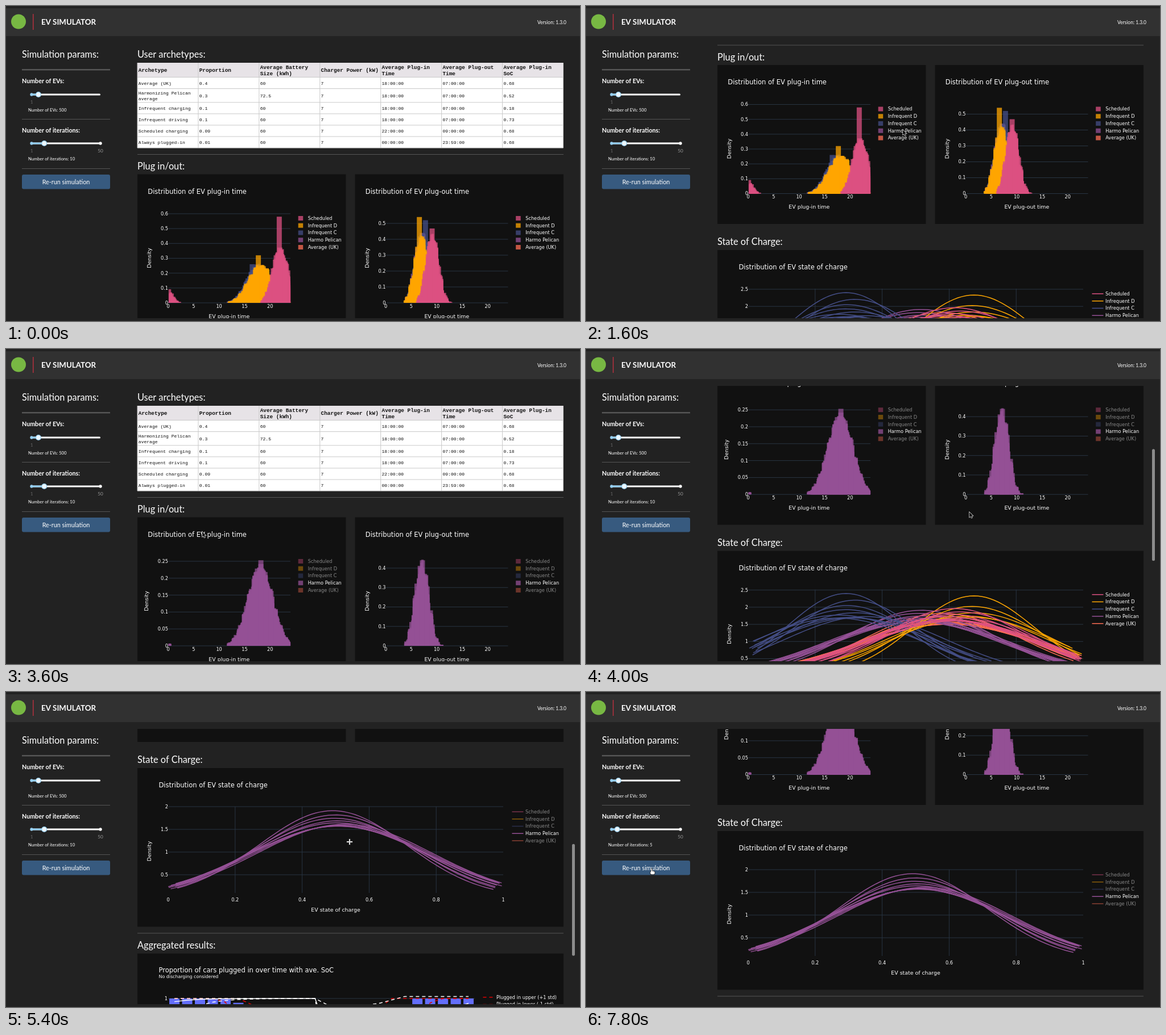
An HTML page with a canvas for the animation above (8 s loop, 1009x555 px).

```html
<!DOCTYPE html>
<html lang="en">
<head>
<meta charset="utf-8">
<title>EV Simulator</title>
<style>
html, body { margin: 0; width: 100%; height: 100%; overflow: hidden; background: #222; }
canvas { display: block; }
</style>
</head>
<body>
<canvas id="stage" width="1009" height="555"></canvas>
<script>
const ctx = document.getElementById('stage').getContext('2d');
const LOOP = 8000, STEP = 200;
const LATO = 'Lato, sans-serif', SANS = '"DejaVu Sans", sans-serif', MONO = '"Liberation Mono", monospace';
const GRID = '#283442', PANEL = '#111', RULE = '#555';

// plugIn / plugOut: bell of hours plus one tall bin; charge: family of bells over 0..1
const TRACES = [
  { name: 'Scheduled', color: '#dd5182',
    plugIn: { mean: 22, sd: 1.4, peak: 0.36, bin: 21.3, top: 0.58 },
    plugOut: { mean: 9.15, sd: 1.15, peak: 0.41, bin: 8.6, top: 0.468 },
    charge: { mean: 0.61, spread: 0.05, low: 1.6, high: 1.96, count: 10 } },
  { name: 'Infrequent D', color: '#ffa600',
    plugIn: { mean: 18.1, sd: 2.3, peak: 0.25, bin: 17.2, top: 0.32 },
    plugOut: { mean: 7, sd: 1.25, peak: 0.41, bin: 6.1, top: 0.54 },
    charge: { mean: 0.66, spread: 0.03, low: 1.7, high: 2.33, count: 5 } },
  { name: 'Infrequent C', color: '#444e86',
    plugIn: { mean: 17.7, sd: 2.2, peak: 0.25, bin: 16, top: 0.26 },
    plugOut: { mean: 7.2, sd: 1.25, peak: 0.42, bin: 7.3, top: 0.52 },
    charge: { mean: 0.31, spread: 0.1, low: 1.68, high: 2.4, count: 10, short: true } },
  { name: 'Harmo Pelican', color: '#955196', focus: true,
    plugIn: { mean: 18.1, sd: 2.35, peak: 0.23, bin: 17.7, top: 0.253 },
    plugOut: { mean: 7.1, sd: 1.25, peak: 0.42, bin: 6.7, top: 0.44 },
    charge: { mean: 0.51, spread: 0.04, low: 1.57, high: 1.91, count: 10 } },
  { name: 'Average (UK)', color: '#ff6e54',
    plugIn: { mean: 18, sd: 2.2, peak: 0.2, bin: 17.5, top: 0.21 },
    plugOut: { mean: 7, sd: 1.1, peak: 0.3, bin: 6.5, top: 0.31 },
    charge: { mean: 0.6, spread: 0.04, low: 1.5, high: 1.82, count: 10 } }
];
const STACK = [...TRACES].reverse();

// stops: [arrive, leave, value...]
const SCROLL = [[0, 300, 0], [1000, 2900, 192.5], [3400, 3650, 0], [4300, 5000, 478.5],
  [5300, 5900, 488.5], [6400, 6650, 658], [7000, LOOP, 377.5]];
const POINTER = [[0, 800, 640, 330], [1600, 2000, 557, 218], [2500, 2800, 938, 218], [3400, 3650, 345, 322],
  [4300, 4900, 935, 260], [5400, 5900, 604, 264], [6600, 6900, 83, 243], [7400, 7400, 55, 241],
  [7700, LOOP, 115, 311]];
const ITERATIONS = [[0, 7100, 10], [7400, LOOP, 5]];

function at(stops, t) {
  const i = stops.findIndex(s => t <= s[1]), to = stops[i], from = stops[i - 1];
  if (!from || t >= to[0]) return to.slice(2);
  const u = (t - from[1]) / (to[0] - from[1]), e = u * u * (3 - 2 * u);
  return from.slice(2).map((v, k) => v + (to[k + 2] - v) * e);
}

function random(seed) {
  return () => {
    seed = (seed * 16807) % 2147483647;
    return seed / 2147483647;
  };
}

const bell = (x, mean, sd) => Math.exp(-((x - mean) ** 2) / (2 * sd * sd));
const sigmoid = x => 1 / (1 + Math.exp(-x));
const clamp01 = x => Math.min(1, Math.max(0, x));

function rect(x, y, w, h, color) {
  ctx.fillStyle = color;
  ctx.fillRect(x, y, w, h);
}

function pill(x, y, w, h, r, color) {
  ctx.fillStyle = color;
  ctx.beginPath();
  ctx.roundRect(x, y, w, h, r);
  ctx.fill();
}

const disc = (x, y, r, color) => pill(x - r, y - r, 2 * r, 2 * r, r, color);

function line(points, color, dash = []) {
  ctx.strokeStyle = color;
  ctx.lineWidth = 1.5;
  ctx.setLineDash(dash);
  ctx.beginPath();
  points.forEach(p => ctx.lineTo(p[0], p[1]));
  ctx.stroke();
  ctx.setLineDash([]);
}

// y is the middle of the capitals
function text(s, x, y, size, { font = SANS, align = 'left', color = '#fff', weight = 400 } = {}) {
  ctx.font = `${weight} ${size}px ${font}`;
  ctx.textAlign = align;
  ctx.fillStyle = color;
  ctx.fillText(s, x, y + size * 0.36);
}

const lato = (s, x, y, size, opts) => text(s, x, y, size, { font: LATO, ...opts });
const heading = (s, x, y) => lato(s, x, y, 16.3);
const title = (s, x, y) => text(s, x, y, 11.5);
const label = (s, x, y, align = 'center') => text(String(s), x, y, 8.2, { align });
const axis = (s, x, y) => text(s, x, y, 9.4, { align: 'center' });

function upright(s, x, y) {
  ctx.save();
  ctx.translate(x, y);
  ctx.rotate(-Math.PI / 2);
  axis(s, 0, 0);
  ctx.restore();
}

function drawHeader() {
  rect(0, 4, 1009, 49, '#313131');
  disc(22, 27.5, 13, '#78b843');
  rect(47, 14, 1.5, 28, '#b5303f');
  lato('EV SIMULATOR', 62, 28.5, 13.3, { weight: 700 });
  lato('Version: 1.3.0', 985, 28.5, 8.5, { align: 'right' });
}

function drawSlider(y, thumb, last) {
  pill(45, y - 1.5, 121, 3, 1.5, '#fff');
  rect(45, y - 1.5, thumb - 45, 3, '#8ecbf0');
  disc(45, y, 2.7, '#96d0f3');
  if (last) disc(166, y, 2.7, '#fff');
  disc(thumb, y, 5, '#96d0f3');
  disc(thumb, y, 3.8, '#eef7fd');
  lato('1', 45, y + 13.5, 8.2, { align: 'center', color: '#666' });
  lato(last, 166, y + 13.5, 8.2, { align: 'center', color: '#999' });
}

function drawSidebar(n) {
  heading('Simulation params:', 28, 85.5);
  rect(28, 111, 155, 2.5, RULE);
  lato('Number of EVs:', 28, 132.5, 10.7, { weight: 700 });
  drawSlider(156, 57, '');
  lato('Number of EVs: 500', 39, 183, 7.6);
  rect(28, 199, 155, 1, RULE);
  lato('Number of iterations:', 28, 219, 10.7, { weight: 700 });
  drawSlider(242, 45 + (n - 1) / 49 * 121, '50');
  lato('Number of iterations: ' + n, 39, 269, 7.6);
  rect(28, 286, 155, 1, RULE);
  pill(28, 297, 155, 25.5, 3, '#375a7f');
  lato('Re-run simulation', 105.5, 310, 10.8, { align: 'center' });
}

function drawTable() {
  const rows = [
    'Archetype,Proportion,Average Battery|Size (kWh),Charger Power (kW),'
      + 'Average Plug-in|Time,Average Plug-out|Time,Average Plug-in|SoC',
    'Average (UK),0.4,60,7,18:00:00,07:00:00,0.68',
    'Harmonizing Pelican|average,0.3,72.5,7,18:00:00,07:00:00,0.52',
    'Infrequent charging,0.1,60,7,18:00:00,07:00:00,0.18',
    'Infrequent driving,0.1,60,7,18:00:00,07:00:00,0.73',
    'Scheduled charging,0.09,60,7,22:00:00,09:00:00,0.68',
    'Always plugged-in,0.01,60,7,00:00:00,23:59:00,0.68'
  ];
  const colX = i => 231 + i * 106.93;
  rect(231, 100, 748.5, 150, '#fff');
  rect(231, 100, 748.5, 25.5, '#e7e3e7');
  let y = 100;
  rows.forEach((row, r) => {
    const h = r === 0 ? 25.5 : row.includes('|') ? 24.3 : 20.05;
    const gap = r ? 10 : 11;
    const style = { font: MONO, color: '#111', weight: r ? 400 : 700 };
    row.split(',').forEach((cell, c) => cell.split('|').forEach((part, k, all) =>
      text(part, colX(c) + 1.8, y + h / 2 + 0.3 + (k - (all.length - 1) / 2) * gap, r ? 8.05 : 9.38, style)));
    y += h;
    rect(231, y - 0.5, 748.5, 1, '#c9c9c9');
  });
  for (let i = 0; i < 8; i++) rect(colX(i) - 0.5, 100, 1, 150, '#c9c9c9');
}

function drawLegend(x, y, solo, bars) {
  TRACES.forEach(({ name, color, focus }, i) => {
    const cy = y + i * 12.75, dim = solo && !focus ? 0.5 : 1;
    ctx.globalAlpha = dim * (bars ? 0.75 : 1);
    if (bars) rect(x, cy - 4, 8.5, 8, color);
    else rect(x, cy - 0.75, 20, 1.5, color);
    ctx.globalAlpha = dim;
    label(name, x + (bars ? 17 : 23.5), cy, 'left');
    ctx.globalAlpha = 1;
  });
}

function drawHistogram(x, kind, key, solo, unit, tick, count) {
  const base = 523, left = x + 54, hour = 8.96;
  rect(x, 296.5, 366.5, 280, PANEL);
  title(`Distribution of EV ${kind} time`, x + 18.3, 326.5);
  for (let i = 0; i <= count; i++) {
    const y = base - i * tick * unit;
    rect(left, y - 0.5, 215, 1, GRID);
    label(+(i * tick).toFixed(2), left, y, 'right');
  }
  const bar = (from, w, h) => {
    const a = from % 24;
    ctx.fillRect(left + a * hour, base - h * unit, Math.min(w, 24 - a) * hour, h * unit);
  };
  ctx.globalAlpha = 0.75;
  STACK.filter(s => s.focus || !solo).forEach((trace, i) => {
    const { mean, sd, peak, bin, top } = trace[key], rnd = random(77 + i * 131);
    ctx.fillStyle = trace.color;
    bar(bin, 1, top);
    // one layer of bins per simulation run
    for (let run = 0; run < 10; run++) {
      const w = run % 2 ? 1 : 0.5;
      for (let a = mean - 2.8 * sd + rnd(); a < mean + 2.6 * sd; a += w) {
        bar(a, w, peak * bell(a + w / 2, mean, sd) * (0.88 + rnd() * 0.18));
      }
    }
  });
  ctx.globalAlpha = 1;
  for (let h = 0; h <= 20; h += 5) label(h, left + h * hour, 529);
  axis(`EV ${kind} time`, x + 161.3, 546.5);
  upright('Density', x + (tick < 0.1 ? 16 : 21), 444);
  drawLegend(x + 282.7, 374, solo, true);
}

function drawCharge(solo) {
  const floor = solo ? 0.1 : 0, unit = solo ? 80 : 60.4;
  const X = v => 285 + v * 589, Y = v => 842.5 - (v - floor) * unit;
  rect(231, 622.5, 749, 279.5, PANEL);
  title('Distribution of EV state of charge', 268.5, 652.3);
  for (let i = 0; i <= 5; i++) {
    if (i % 5) rect(X(i / 5) - 0.5, 690.5, 1, 152, GRID);
    label(i / 5, X(i / 5), 855);
  }
  for (let v = solo ? 0.5 : 0; v <= (solo ? 2 : 2.5); v += 0.5) {
    rect(285, Y(v) - 0.5, 589, 1, GRID);
    label(v, 285, Y(v), 'right');
  }
  STACK.filter(s => s.focus || !solo).forEach(({ color, charge: c }, i) => {
    const rnd = random(4021 + i * 977000);
    for (let k = 0; k < c.count; k++) {
      const peak = c.low + (c.high - c.low) * (1 - k / c.count) ** 3;
      const mean = c.mean + (rnd() - 0.5) * c.spread;
      const from = rnd() * 0.03, to = c.short ? 0.67 + rnd() * 0.3 : 0.96 + rnd() * 0.037;
      const points = [];
      for (let u = 0; u <= 1; u += 0.0125) {
        const v = from + (to - from) * u;
        points.push([X(v), Y(peak * bell(v, mean, 0.42 / peak))]);
      }
      line(points, color);
    }
  });
  axis('EV state of charge', 579.5, 872.5);
  upright('Density', 252, 769);
  drawLegend(889.5, 699.5, solo, false);
}

// share of cars at home: away between two hours
const home = (leave, back) => h => clamp01(1.03 * (sigmoid(2.2 * (leave - h)) + sigmoid(2.2 * (h - back))));
// charge tops up overnight, drops at noon and climbs again from 16:00
const level = (dip, low, end, rise) => h => h < 12
  ? 1 - dip * Math.exp((0.5 - h) / 1.6)
  : low + (end - low) * clamp01((h - 16) / rise);

const RED = '#e00000', DASH = [6, 5];
const LINES = [
  ['Plugged in upper (+1 std)', RED, DASH, home(7.5, 15.7)],
  ['Plugged in lower (-1 std)', RED, DASH, home(5.65, 19.4)],
  ['Mean SoC', '#fff', [], level(0.04, 0.53, 0.94, 7.5)],
  ['Upper SoC', '#fff', DASH, level(0, 0.917, 1.025, 2.5)],
  ['Lower SoC', '#fff', DASH, level(0.3, 0.067, 0.58, 7.5)]
];

function drawTotals() {
  const X = h => 284.8 + h * 22.48, Y = v => 1169 - v * 140.5;
  const hours = Array.from({ length: 24 }, (_, i) => i + 0.5);
  const cars = home(6.6, 17.6);
  rect(231, 949.3, 749, 279.5, PANEL);
  title('Proportion of cars plugged in over time with ave. SoC', 268.5, 978.5);
  text('No discharging considered', 268.5, 989.7, 7.9);
  for (let i = 0; i <= 5; i++) {
    rect(285, Y(i / 5) - 0.5, 539, 1, GRID);
    label(i / 5, 284, Y(i / 5), 'right');
  }
  hours.forEach((h, i) => {
    rect(X(h) - 9, Y(cars(h)), 18, 1169 - Y(cars(h)), '#636efa');
    label(i ? h : '0.4995', X(h), 1181);
  });
  LINES.forEach(([name, color, dash, value], i) => {
    const y = 1026.2 + i * 12.75;
    line(hours.map(h => [X(h), Y(value(h))]), color, dash);
    line([[838.5, y], [858.5, y]], color, dash);
    label(name, 862, y, 'left');
  });
  axis('Time of day', 554.5, 1199);
  upright('Proportion of cars', 252, 1095.5);
}

function drawPage(t, scroll) {
  const soloIn = t >= 1800, soloOut = t >= 2600;
  ctx.save();
  ctx.beginPath();
  ctx.rect(225, 65, 760, 485);
  ctx.clip();
  ctx.translate(0, -scroll);
  heading('User archetypes:', 231, 85.5);
  drawTable();
  rect(231, 261, 749, 1, RULE);
  heading('Plug in/out:', 231, 282.3);
  drawHistogram(231, 'plug-in', 'plugIn', soloIn, soloIn ? 596 : 261.7, soloIn ? 0.05 : 0.1, soloIn ? 5 : 6);
  drawHistogram(613.5, 'plug-out', 'plugOut', soloOut, soloOut ? 342.5 : 280, 0.1, soloOut ? 4 : 5);
  heading('State of Charge:', 231, 607.5);
  drawCharge(t >= 4800);
  rect(231, 913, 749, 1, RULE);
  heading('Aggregated results:', 231, 934.5);
  drawTotals();
  ctx.restore();
}

function arrow() {
  const points = [[0, 0], [0, 9], [2, 7.2], [3.4, 10.4], [5, 9.7], [3.6, 6.6], [6.3, 6.4]];
  ctx.beginPath();
  points.forEach(p => ctx.lineTo(p[0], p[1]));
  ctx.closePath();
  ctx.fillStyle = '#111';
  ctx.strokeStyle = '#fff';
  ctx.lineWidth = 1.2;
  ctx.stroke();
  ctx.fill();
}

function hand() {
  pill(-1, -0.5, 3, 8, 1.5, '#222');
  pill(-2.5, 4, 9, 7, 2.5, '#222');
  pill(-0.3, 0.2, 1.6, 7, 0.8, '#fff');
  pill(-1.7, 4.8, 7.4, 5.4, 2, '#fff');
}

function cross() {
  for (const [r, color] of [[1.8, '#222'], [1, '#ddd']]) {
    rect(-r, -4 - r, 2 * r, 8 + 2 * r, color);
    rect(-4 - r, -r, 8 + 2 * r, 2 * r, color);
  }
}

function drawPointer(t) {
  if (t < 400) return;
  ctx.save();
  ctx.translate(...at(POINTER, t));
  if (t >= 5200 && t <= 6000) cross();
  else if ((t >= 4200 && t < 5200) || t >= 7600) hand();
  else arrow();
  ctx.restore();
}

function draw(t) {
  const [scroll] = at(SCROLL, t);
  rect(0, 0, 1009, 555, '#222');
  drawHeader();
  drawSidebar(Math.round(at(ITERATIONS, t)[0]));
  drawPage(t, scroll);
  const scrolling = (t >= 400 && t < 1400) || (t >= 3000 && t < 3500) || (t >= 3800 && t < 7200);
  if (scrolling) pill(995, 66 + scroll * 0.413, 5, 197, 2.5, '#8b8b8b');
  drawPointer(t);
}

const start = performance.now();
let shown = -1;
function tick(now) {
  const t = Math.floor((Math.max(0, now - start) % LOOP) / STEP) * STEP;
  if (t !== shown) draw(shown = t);
  requestAnimationFrame(tick);
}
tick(start);
</script>
</body>
</html>
```
